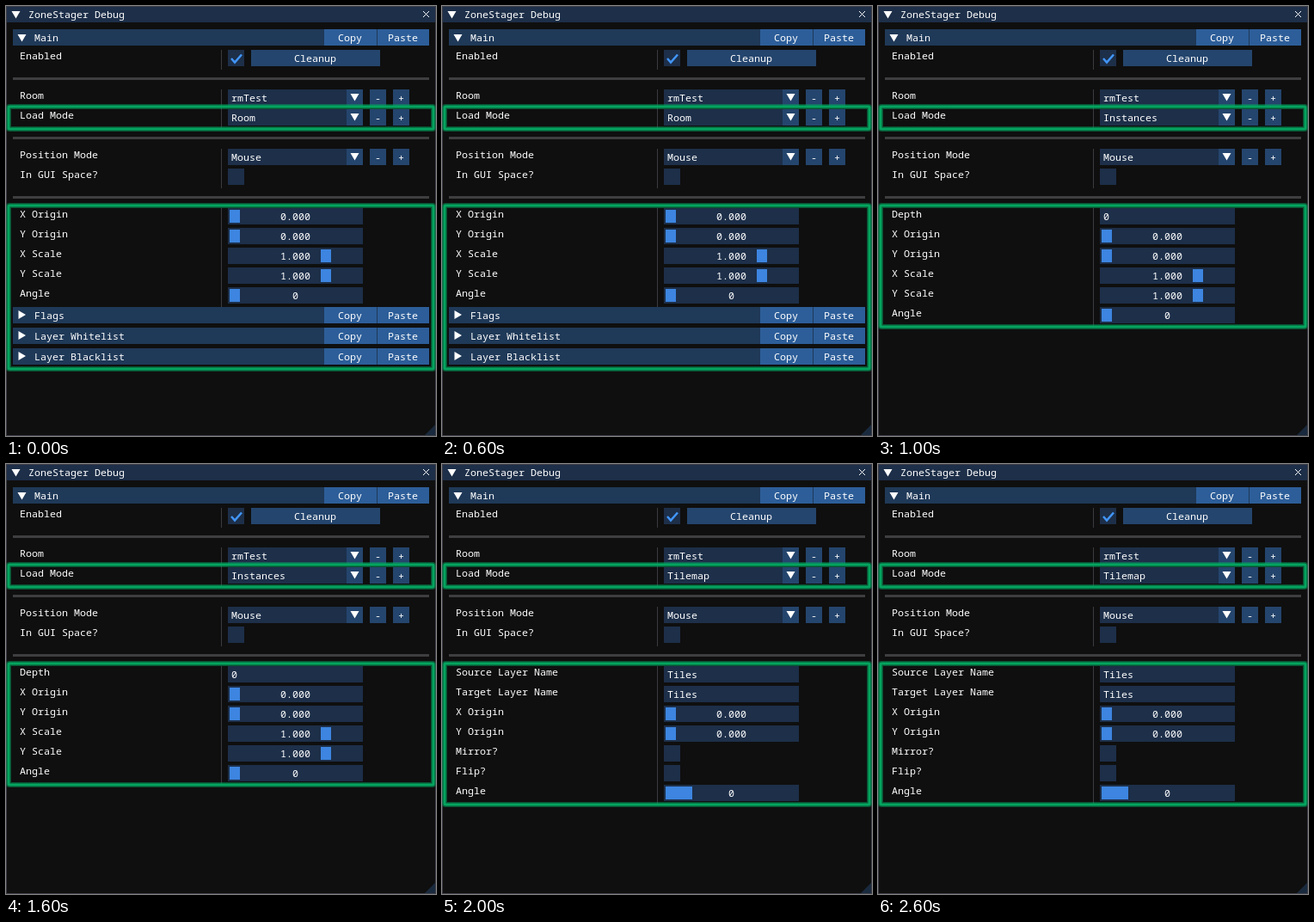
Recreate the animation shown at these times as an HTML page. Size 500x500 px, loop 3 s.

```html
<!DOCTYPE html>
<html lang="en">
<head>
<meta charset="utf-8">
<title>Debug panel</title>
<style>
  html, body { margin: 0; width: 100%; height: 100%; overflow: hidden; background: #0f0f0f; }
  svg { display: block; width: 500px; height: 500px; }
  text { font: 11.667px "Noto Sans Mono", monospace; fill: #fff; white-space: pre; }
  rect { shape-rendering: crispEdges; }
  .mode { animation: show 3s step-end infinite; }
  @keyframes show {
    0% { visibility: visible; }
    33.3333%, 100% { visibility: hidden; }
  }
</style>
</head>
<body>
<svg id="stage" viewBox="0 0 500 500"></svg>
<script>
const FRAME = '#1d2f49', HEADER = '#1f3958', BUTTON = '#24456d', HEADER_BUTTON = '#2d5e99';
const GRAB = '#3d85e0', CHECK = '#4296fa', LINE = '#3b3b40', GREEN = '#04a45f';
const ROW = 23, CHAR = 7, FIELD_X = 258, FIELD_W = 157, SIZE = 19;

const rect = (x, y, w, h, fill) =>
  `<rect x="${x}" y="${y}" width="${w}" height="${h}" fill="${fill}"/>`;
const text = (x, y, s) => `<text x="${x}" y="${y}">${s}</text>`;
const poly = (points, fill = '#fff') => `<polygon points="${points}" fill="${fill}"/>`;
const down = (x, y) => poly(`${x},${y} ${x + 10},${y} ${x + 5},${y + 8.5}`);
const right = (x, y) => poly(`${x},${y} ${x + 8.5},${y + 5} ${x},${y + 10}`);

const button = (x, y, w, s, fill = BUTTON) =>
  rect(x, y, w, SIZE, fill) + text(Math.floor(x + (w - s.length * CHAR) / 2), y + 14, s);
const label = (y, s) => text(16, y + 11, s);
const column = (y, rows) => rect(250, y, 1, rows * ROW, LINE);
const separator = y => rect(8, y, 484, 3, '#3e3e40');

const box = y => rect(FIELD_X, y, SIZE, SIZE, FRAME);
const field = (y, s) => rect(FIELD_X, y, FIELD_W, SIZE, FRAME) + text(262, y + 14, s);
const slider = (y, s, x = 260, w = 12) =>
  rect(FIELD_X, y, FIELD_W, SIZE, FRAME) + rect(x, y + 2, w, 15, GRAB) +
  text(Math.floor(336.5 - s.length * CHAR / 2), y + 14, s);
const combo = (y, s) =>
  field(y, s) + rect(396, y, SIZE, SIZE, BUTTON) + down(400.5, y + 5) +
  button(423, y, SIZE, '-') + button(450, y, SIZE, '+');
const header = (y, s, open) =>
  rect(8, y, 362, SIZE, HEADER) + (open ? down(13.5, y + 6) : right(14.5, y + 4)) +
  text(33, y + 14, s) + button(370, y, 61, 'Copy', HEADER_BUTTON) +
  rect(431, y, 1, SIZE, HEADER) + button(432, y, 60, 'Paste', HEADER_BUTTON);

const outline = (top, bottom) => [[6, .45], [3, 1]].map(([w, a]) =>
  `<rect x="3" y="${top}" width="494" height="${bottom - top}" rx="1" fill="none" ` +
  `stroke="${GREEN}" stroke-width="${w}" stroke-opacity="${a}" style="shape-rendering:auto"/>`).join('');

const origin = [['X Origin', y => slider(y, '0.000')], ['Y Origin', y => slider(y, '0.000')]];
const scale = ['X', 'Y'].map(a => [a + ' Scale', y => slider(y, '1.000', 366)]);
const angle = w => ['Angle', y => slider(y, '0', 260, w)];
const layer = s => [s + ' Layer Name', y => field(y, 'Tiles')];

const modes = [
  { name: 'Room', end: 422, rows: [...origin, ...scale, angle(12)],
    extra: ['Flags', 'Layer Whitelist', 'Layer Blacklist'] },
  { name: 'Instances', end: 373, rows: [['Depth', y => field(y, '0')], ...origin, ...scale, angle(12)] },
  { name: 'Tilemap', end: 396,
    rows: [layer('Source'), layer('Target'), ...origin, ['Mirror?', box], ['Flip?', box], angle(31)] }
];

const modeView = ({ name, end, rows, extra = [] }, i) =>
  `<g class="mode" style="animation-delay:${i - 3}s">` +
  text(262, 134, name) + column(235, rows.length) +
  rows.map(([s, draw], n) => label(235 + n * ROW, s) + draw(235 + n * ROW)).join('') +
  extra.map((s, n) => header(350 + n * 24, s)).join('') +
  outline(232, end) + '</g>';

const panel =
  rect(0, 0, 500, 500, '#3e3e47') + rect(1, 1, 498, 498, '#0f0f0f') +
  rect(1, 1, 498, 18, FRAME) + down(6.5, 6) + text(26, 14, 'ZoneStager Debug') +
  '<path d="M485 6l7 7m0-7l-7 7" stroke="#fff" fill="none"/>' +
  poly('499,487 499,499 487,499', '#1a2a3e') +
  header(27, 'Main', true) +
  column(51, 1) + label(51, 'Enabled') + box(51) +
  `<path d="M262 61l4 4.5 8-9" stroke="${CHECK}" stroke-width="2.5" fill="none"/>` +
  button(285, 51, 150, 'Cleanup') + separator(83) +
  column(97, 2) + label(97, 'Room') + combo(97, 'rmTest') +
  label(120, 'Load Mode') + combo(120, '') + separator(152) +
  column(166, 2) + label(166, 'Position Mode') + combo(166, 'Mouse') +
  label(189, 'In GUI Space?') + box(189) + separator(221) +
  outline(117, 143);

document.getElementById('stage').innerHTML = panel + modes.map(modeView).join('');
</script>
</body>
</html>
```
